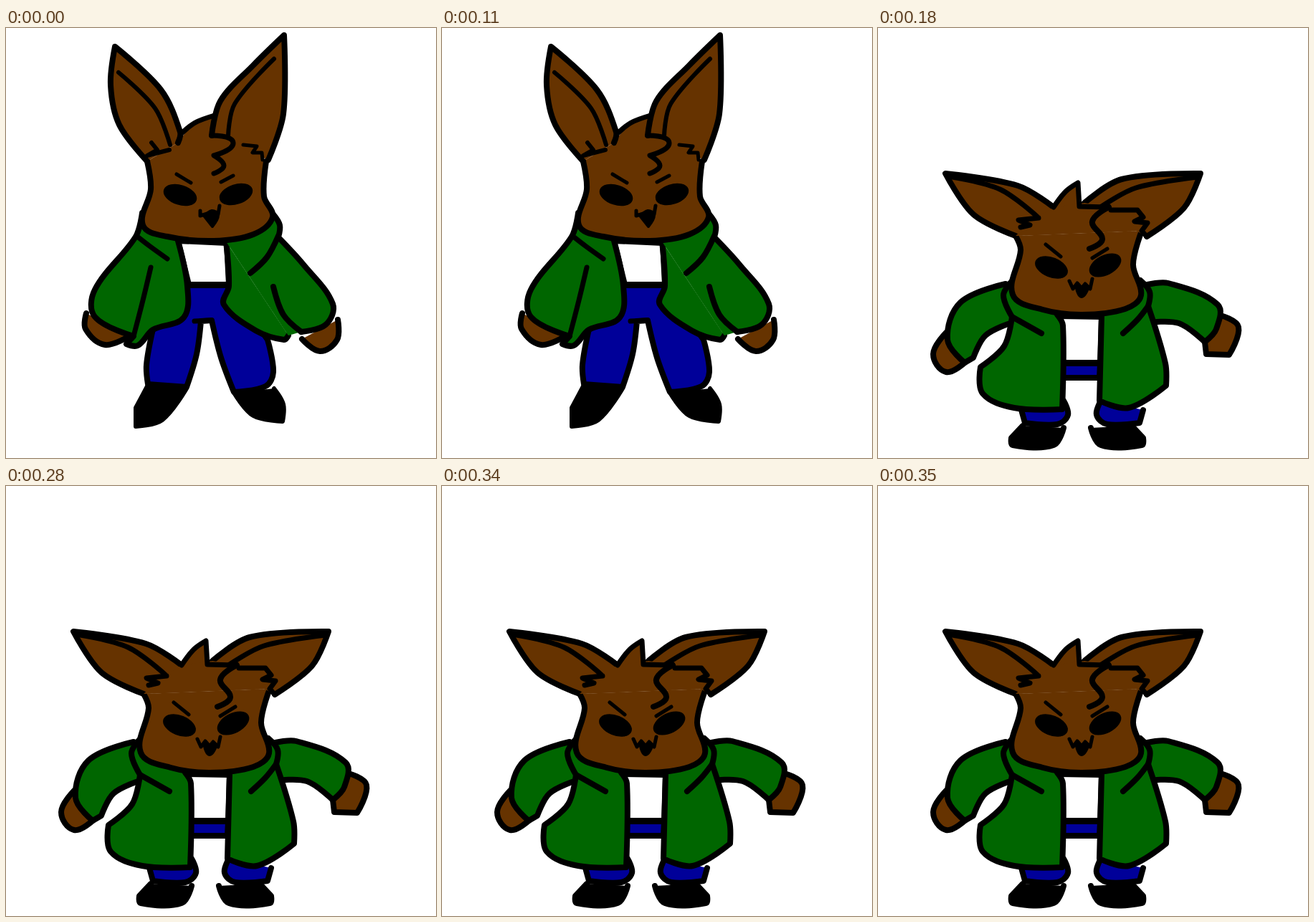
These frames come from a looping animation (600x600 px, 0.36 s). An HTML page:

```html
<!DOCTYPE html>
<html lang="en">
<head>
<meta charset="utf-8">
<title>Hopping creature</title>
<style>
  html, body { margin: 0; width: 100%; height: 100%; overflow: hidden; background: #fff; }
  svg { display: block; width: 100vw; height: 100vh; }
  path, ellipse { stroke: #000; stroke-width: 8; stroke-linecap: round; stroke-linejoin: round; }
  ellipse { stroke-width: 2; }
</style>
</head>
<body>
<svg id="stage" viewBox="0 0 600 600"></svg>
<script>
const BROWN = '#663300', GREEN = '#006600', BLUE = '#000099', WHITE = '#fff', INK = '#000';
const LOOP = 360, LAND = 180;
const stage = document.getElementById('stage');

function make(tag, parent, attrs = {}) {
  const node = document.createElementNS('http://www.w3.org/2000/svg', tag);
  for (const key in attrs) node.setAttribute(key, attrs[key]);
  parent.append(node);
  return node;
}

// Smooth curve through "x,y" key points; "!" marks a sharp corner.
// Handles follow the neighbours' direction and a third of the segment length.
function curve(text) {
  const pts = text.split(' ').map(s => {
    const [x, y] = s.replace('!', '').split(',').map(Number);
    return { x, y, sharp: s.endsWith('!') };
  });
  const handle = (i, reach) => {
    const p = pts[i], a = pts[i - 1], b = pts[i + 1];
    if (p.sharp || !a || !b) return `${p.x} ${p.y}`;
    const k = reach / Math.hypot(b.x - a.x, b.y - a.y);
    return `${p.x + (b.x - a.x) * k} ${p.y + (b.y - a.y) * k}`;
  };
  return pts.slice(1).reduce((d, q, i) => {
    const reach = Math.hypot(q.x - pts[i].x, q.y - pts[i].y) / 3;
    return `${d}C${handle(i, reach)} ${handle(i + 1, -reach)} ${q.x} ${q.y}`;
  }, `M${pts[0].x} ${pts[0].y}`);
}

// Open outlines keep the seam between two parts of one colour free of ink.
function pen(group) {
  const part = (fill, pts, width = 8) => {
    const path = make('path', group, { d: curve(pts), fill });
    path.style.strokeWidth = width;
    return path;
  };
  const line = (pts, width = 7) => part('none', pts, width);
  const both = (axis, fill, pts) => {
    part(fill, pts);
    part(fill, pts).setAttribute('transform', `translate(${2 * axis}) scale(-1 1)`);
  };
  const eye = (cx, cy, tilt) =>
    make('ellipse', group, { cx, cy, rx: 23, ry: 13, transform: `rotate(${tilt} ${cx} ${cy})` });
  return { part, line, both, eye };
}

function drawTall({ part, line, eye }) {
  part(BLUE, '255,359! 311,359! 365,435! 373,480 362,500 318,508! 300,460 287,408! 272,409! 266,455 252,501! 198,497! 196,470 205,420');
  line('263,409 287,408');
  part(INK, '197,500! 181,530! 181,556! 218,547 252,503!', 6);
  part(INK, '318,509! 345,541 386,549! 387,525 374,503!', 6);

  part(BROWN, '112,398! 111,420 138,442 172,430!');
  part(BROWN, '463,407! 462,435 438,451 413,434!');

  part(WHITE, '240,297! 308,300! 311,358! 255,358! 240,297');
  part(GREEN, '190,258! 181,291 124,365 124,403 178,430! 168,441! 184,443 205,421 248,404 253,360 240,297!');
  line('182,290 200,304 225,322');
  line('202,334 191,380 178,430');
  part(GREEN, '307,298! 311,360 304,386 350,423 388,435 394,429');
  part(GREEN, '307,298! 394,429! 412,424! 448,412 456,385 380,292! 382,275 373,260!', 0);
  line('412,424! 446,414 456,385 415,330 380,292! 382,275 373,260!', 8);
  line('380,290 364,320 341,342', 8);
  line('373,361 387,400 412,424', 8);

  part(BROWN, '240,160! 262,134 291,123 362,186! 197,186!', 0);
  part(BROWN, '197,186! 202,225 191,275 225,291 290,297 345,288 372,264 360,235 363,186!');
  part(BROWN, '197,186! 158,135 146,80 152,26! 216,86 243,145 240,160');
  part(BROWN, '366,184! 387,120 388,10! 345,52 299,102 287,150!');
  line('245,147 264,132 291,122');
  line('287,150! 317,160 290,178! 304,192 290,203');
  line('157,62 208,112 229,163', 6);
  line('374,43 319,106 310,150', 6);
  line('203,160! 211,170! 197,178! 228,170!', 6);
  line('331,163! 350,165! 344,174! 357,174! 358,184!', 5);

  eye(243, 233, 18);
  eye(321, 232, -18);
  line('238,204 258,216', 5);
  line('317,206 300,215', 5);
  line('271,255 271,262! 284,258! 296,260! 298,248!', 5);
  part(INK, '277,263! 287,255 296,261 288,277! 277,263!', 4);
}

function drawSquat({ part, line, both, eye }) {
  part(BLUE, '258,468! 310,468! 309,488! 258,488!');
  both(285, BLUE, '200,533! 205,551! 250,553 265,540 259,520!');
  both(278, INK, '202,555! 186,572! 188,582 245,582 259,558!');

  part(BROWN, '95,425! 77,455 95,480 122,466!');
  part(BROWN, '478,401! 503,417 490,456! 458,455! 456,438!');
  part(GREEN, '178,357! 115,383 97,435 121,467! 133,460! 150,429 187,411!');
  part(GREEN, '376,358! 405,356 474,386 472,420 456,438! 420,412 378,411!');

  part(WHITE, '250,402! 312,403! 310,467! 258,467!');
  part(GREEN, '187,353! 175,373 187,403! 176,444 143,473! 146,510 190,530 257,532! 258,415 250,400!');
  line('187,403 228,426', 8);
  part(GREEN, '312,402! 309,520! 350,530 402,499! 401,468 377,388! 379,368 366,352!');
  line('377,388 362,407 342,426', 8);

  part(BROWN, '222,264! 245,249! 262,228 279,216! 281,249! 362,254! 368,283! 192,290!', 0);
  part(BROWN, '192,290! 199,310 188,372 230,393 285,400 345,392 367,373 356,330 368,283!');
  part(BROWN, '192,290! 133,260 94,203! 195,220 245,250!');
  part(BROWN, '288,244! 340,211 450,203! 427,251 375,291!');
  part(BROWN, '222,264! 245,250! 288,244! 362,254! 368,283! 192,290!', 0);
  line('245,250! 262,228 279,216! 281,249! 320,250');
  line('98,207 170,225 222,263');
  line('447,208 360,223 312,249');
  line('224,265! 196,268! 212,275! 199,278!');
  line('325,254! 362,254! 370,264! 358,270! 376,272! 368,283! 375,291!');
  line('322,250 299,270 313,295 295,308', 8);

  eye(242, 334, 22);
  eye(317, 331, -27);
  line('234,302 255,319', 5);
  line('320,308 299,321', 5);
  line('267,353 272,364! 278,356! 284,363! 289,357! 296,364! 299,350', 5);
  part(INK, '277,363! 293,363! 284,375 277,363!', 4);
}

const poses = [drawTall, drawSquat].map(draw => {
  const group = make('g', stage);
  draw(pen(group));
  return group;
});

function show() {
  const current = performance.now() % LOOP < LAND ? 0 : 1;
  poses.forEach((pose, i) => pose.style.display = i === current ? '' : 'none');
  requestAnimationFrame(show);
}
show();
</script>
</body>
</html>
```
